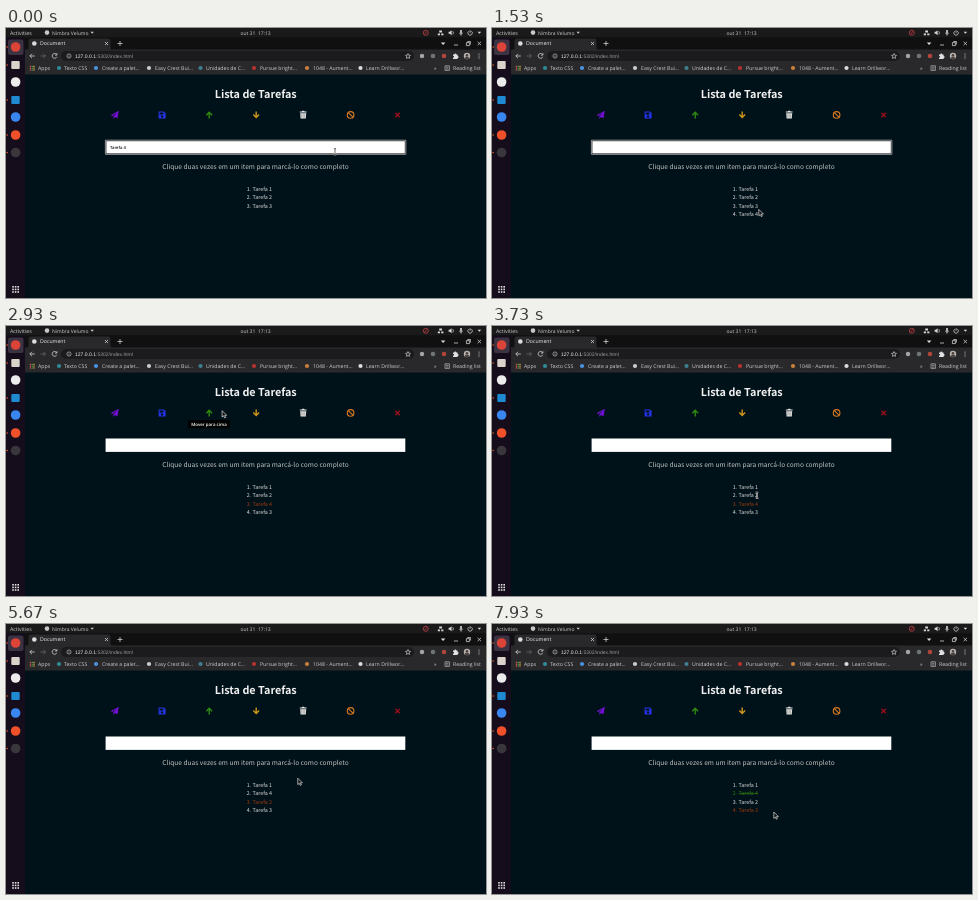
Animation of 480x270 px, one loop 8 s. Source, as an HTML page:

```html
<!DOCTYPE html>
<html lang="pt">
<head>
<meta charset="utf-8">
<title>Lista de Tarefas</title>
<style>
html, body { margin: 0; width: 100%; height: 100%; overflow: hidden; background: #001219; }
svg { display: block; width: 480px; height: 270px; }
text { font-family: "Open Sans", "Noto Sans", sans-serif; font-size: 5.2px; fill: #cecece; white-space: pre; text-rendering: geometricPrecision; }
.page text { font-family: "Noto Sans CJK JP", "Noto Sans CJK", "Noto Sans", sans-serif; fill: #dedede; }
.page .title { font-size: 10.8px; font-weight: 700; fill: #f0f0f0; }
.page .hint { font-size: 6.6px; fill: #c4c4c4; }
.page .row { font-size: 5.35px; }
.page .field { font: 600 4.15px "Open Sans", sans-serif; fill: #111; }
.url { font: 5.04px "Liberation Sans", Arial, sans-serif; fill: #9a9a9c; }
.tip text { font: 600 4.4px "Open Sans", sans-serif; fill: #fff; }
.mid { text-anchor: middle; }
.ln { fill: none; stroke: #cfcfcf; stroke-width: .8; }
</style>
</head>
<body>
<svg viewBox="0 0 480 270" xmlns="http://www.w3.org/2000/svg">
  <rect width="480" height="270" fill="#001219"/>

  <!-- desktop bar -->
  <rect width="480" height="9.5" fill="#1a1a1a"/>
  <text x="4" y="6.6" style="font-size:5.3px">Activities</text>
  <circle cx="41" cy="4.6" r="2.3" fill="#c8c8c8"/>
  <text x="46" y="6.6" style="font-size:5px">Nimbra Velumo</text>
  <path d="M84.5 3.8h3.4l-1.7 2z" fill="#ccc"/>
  <text x="249.6" y="6.6" class="mid" style="font-size:5px">out 31  17:13</text>
  <g class="ln">
    <circle cx="419.8" cy="4.8" r="2.5" stroke="#c8404a"/>
    <path d="M418.6 6.2l2.4-2.8" stroke="#c8404a"/>
    <path d="M446.8 3.2q1.2 1.6 0 3.2M453.2 5q1.8 2.4 3.6 0M455 6v1.6M462.8 3.2a2.2 2.2 0 1 0 2.6 0M464.1 2.2v2.6"/>
  </g>
  <path d="M433.2 2.6h2.8v2h-2.8zM431.8 5.4h2.2v1.8h-2.2zM435.2 5.4h2.2v1.8h-2.2zM442.6 3.8h1.2l1.8-1.5v5l-1.8-1.5h-1.2zM454.2 2h1.6v3.4h-1.6zM471.6 3.8h3.6l-1.8 2z" fill="#d8d8d8"/>

  <!-- browser -->
  <rect x="19" y="9.5" width="461" height="12.5" fill="#101011"/>
  <path d="M21 22q1.5 0 1.5-2v-7q0-2.5 2.5-2.5h77q2.5 0 2.5 2.5v7q0 2 1.5 2z" fill="#29292c"/>
  <rect x="19" y="21.5" width="461" height="25" fill="#29292c"/>
  <rect x="55" y="23" width="353" height="10" rx="5" fill="#1b1b1d"/>
  <circle cx="28.3" cy="15.5" r="2.3" fill="#dcdcdc"/>
  <text x="34" y="17.4" style="fill:#eee">Document</text>
  <path class="ln" d="M99 14l3 3m0-3l-3 3M114 13v5m-2.5-2.5h5M448 17h4M460.4 14.6h3v3h-3zM461.4 13.5h3v3M471.6 13.8l3.4 3.4m0-3.4l-3.4 3.4"/>
  <path d="M434.9 14.6h4.4l-2.2 2.4z" fill="#ddd"/>
  <path class="ln" d="M28.8 28h-5m2.2-2.2L23.8 28l2.2 2.2M50.6 26.6a2.4 2.4 0 1 0 .2 2.2M50.9 25.2v1.9H49"/>
  <path class="ln" d="M34.5 28h5m-2.2-2.2l2.2 2.2-2.2 2.2" style="stroke:#666"/>
  <circle class="ln" cx="63" cy="28" r="2.1" style="stroke-width:.6"/>
  <path class="ln" d="M63 27.7v1.5m0-2.5v.5" style="stroke-width:.6"/>
  <text x="69" y="29.8" class="url"><tspan fill="#f0f0f0">127.0.0.1</tspan>:5302/index.html</text>
  <path d="M402 25.6l.7 1.6 1.8.2-1.3 1.2.3 1.8-1.5-.9-1.5.9.3-1.8-1.3-1.2 1.8-.2z" class="ln" style="stroke-width:.7"/>
  <circle cx="416" cy="28" r="2.2" fill="#a5a5a5"/>
  <circle cx="427" cy="28" r="2.3" fill="#6f7478"/>
  <circle cx="438" cy="28" r="2.3" fill="#b0453c"/>
  <path d="M447 26.5h1.3a1 1 0 0 1 2 0h1.3v1.4a1 1 0 0 1 0 2v1H447v-1.2a1 1 0 0 0 0-2z" fill="#e2e2e2"/>
  <circle cx="461" cy="28" r="3.2" fill="#b9b2ac"/>
  <path d="M458.6 30.2q.4-1.6 2.4-1.6t2.4 1.6q-2.4 2-4.8 0z" fill="#4a4240"/>
  <circle cx="461" cy="27.2" r="1.3" fill="#4a4240"/>
  <g fill="#d0d0d0"><circle cx="473" cy="26" r=".6"/><circle cx="473" cy="28" r=".6"/><circle cx="473" cy="30" r=".6"/></g>
  <g id="marks"></g>
  <text x="428" y="41.8">»</text>
  <path class="ln" d="M439 37.8h4.4v4.6H439zM440 39.3h2.4M440 41h2.4" style="stroke-width:.6"/>
  <text x="447" y="41.8">Reading list</text>

  <!-- dock -->
  <rect y="9.5" width="19" height="260.5" fill="#150d1b"/>
  <rect x="2" y="11.5" width="15.5" height="15.5" rx="2" fill="#3c3342"/>
  <g id="dock"></g>

  <!-- page -->
  <g class="page">
    <text x="249.7" y="69.8" class="title mid">Lista de Tarefas</text>
    <g>
      <path d="M104.6 87.2l8.2-4.4-1.3 7.4-2.7-1.1-1.5 1.8v-2.5l4-4.2-4.9 3.9z" fill="#7410d8"/>
      <path d="M152.6 83.4h5.4l1.6 1.6v5.4h-7zM153.7 84.4v2h3.7v-2zM156 87.3a1.2 1.2 0 1 0 .1 0z" fill="#2433e6" fill-rule="evenodd"/>
      <path d="M203.2 90.4v-6.2m-2.9 3l2.9-3 2.9 3" fill="none" stroke="#2f8a10" stroke-width="1.4"/>
      <path d="M250.2 83.4v6.2m-2.9-3l2.9 3 2.9-3" fill="none" stroke="#cc961c" stroke-width="1.4"/>
      <path d="M293.8 83.6h2l.5-.8h1.8l.5.8h2v1h-6.8zM294.2 85.2h6l-.4 5.4h-5.2z" fill="#e4e4e4"/>
      <path d="M295.7 86.2v3.4m1.5-3.4v3.4m1.5-3.4v3.4" stroke="#777" stroke-width=".5"/>
      <g fill="none" stroke="#d87a22" stroke-width="1.1"><circle cx="344.6" cy="86.9" r="3.3"/><path d="M342.3 84.6l4.6 4.6"/></g>
      <path d="M389.4 84.7l4.4 4.4m0-4.4l-4.4 4.4" stroke="#900f1b" stroke-width="1.5"/>
    </g>
    <g id="ring">
      <rect x="98.9" y="111.8" width="301.4" height="15" rx="1" fill="#b0b0b0"/>
      <rect x="99.7" y="112.5" width="299.8" height="13.6" fill="#222"/>
    </g>
    <rect id="box" fill="#fff"/>
    <text id="field" x="104" y="120.6" class="field">Tarefa 4</text>
    <rect id="caret" x="103.8" y="116.2" width=".5" height="5.6" fill="#111"/>
    <text x="249.5" y="141.4" class="hint mid">Clique duas vezes em um item para marcá-lo como completo</text>
    <g id="rows"></g>
    <g id="mark">
      <rect x="263.7" y="165" width="3.2" height="8.2" fill="#2a66e0"/>
      <text x="263.8" y="171.35" class="row">4</text>
    </g>
  </g>

  <g class="tip" id="tip">
    <rect y="94" width="42" height="8.3" rx="1" fill="#000"/>
    <text x="21" y="99.9" class="mid"></text>
  </g>

  <g id="cursor">
    <path id="arrow" d="M0 0v6.4l1.5-1.3 1 2.1 1.1-.5-1-2.1h2z" fill="#111" stroke="#fff" stroke-width=".6"/>
    <g id="beam" fill="none">
      <path d="M-1.2-2.9h2.4M0-2.9v5.8M-1.2 2.9h2.4" stroke="#fff" stroke-width="1.4"/>
      <path d="M-1.1-2.9h2.2M0-2.9v5.8M-1.1 2.9h2.2" stroke="#111" stroke-width=".6"/>
    </g>
    <path id="hand" d="M-.7 0q.7-.8 1.4 0v2.4l2.6.7q.7.2.6 1l-.6 2.7h-3.6l-2-2.8q0-.9.9-.7l.7.6z" fill="#fff" stroke="#111" stroke-width=".4"/>
  </g>
</svg>
<script>
const LOOP = 8000;
const $ = id => document.getElementById(id);

function add(parent, tag, attrs, text) {
  const el = document.createElementNS("http://www.w3.org/2000/svg", tag);
  for (const k in attrs) el.setAttribute(k, attrs[k]);
  if (text) el.textContent = text;
  parent.append(el);
  return el;
}
const show = (id, on) => { $(id).style.display = on ? "" : "none"; };
const dot = (parent, cx, cy, r, fill) => add(parent, "circle", { cx, cy, r, fill });

// Bookmarks: icon x, label x, colour, label
[
  [53, 58, "#2f8b98", "Texto CSS"],
  [90, 96, "#4b93e0", "Create a palet..."],
  [143, 149, "#c8cdd0", "Easy Crest Bui..."],
  [194.5, 200, "#3f8090", "Unidades de C..."],
  [248, 254, "#b8322e", "Pursue bright..."],
  [301, 307, "#c9803a", "1048 - Aument..."],
  [354.5, 360, "#dcdcdc", "Learn Drillwor..."]
].forEach(([ix, x, fill, label]) => {
  dot($("marks"), ix, 40, 2.1, fill);
  add($("marks"), "text", { x, y: 41.8 }, label);
});
add($("marks"), "text", { x: 32, y: 41.8 }, "Apps");

const grid = (parent, x, y, gap, size, color) => {
  for (let i = 0; i < 9; i++)
    add(parent, "rect", { x: x + i % 3 * gap, y: y + Math.floor(i / 3) * gap, width: size, height: size, fill: color(i) });
};
grid($("marks"), 23.8, 37.8, 1.8, 1.2, i => ["#d9534a", "#4f9d5b", "#d8b23c"][i % 3]);
grid($("dock"), 6.2, 258, 2.6, 1.6, () => "#e0e0e0");

// Dock: y, colour, square?, running?
[
  [19, "#db4437", 0, 1], [37, "#d9d3cb", 1, 1], [54, "#ececec", 0, 0], [72, "#1f8ad2", 1, 1],
  [89, "#3a86f0", 0, 0], [107, "#f0502a", 0, 1], [124.5, "#39363c", 0, 1]
].forEach(([y, fill, square, live]) => {
  if (square) add($("dock"), "rect", { x: 5.3, y: y - 4, width: 8.4, height: 8, rx: 1, fill });
  else dot($("dock"), 9.6, y, 4.8, fill);
  if (live) dot($("dock"), 1.2, y, .8, "#e0562c");
});

const rows = [0, 1, 2, 3].map(i => {
  const y = 162.9 + i * 8.45;
  const g = add($("rows"), "g", {});
  add(g, "text", { x: 240.7, y, class: "row" }, i + 1 + ".");
  return { g, label: add(g, "text", { x: 246.5, y, class: "row" }) };
});

// List: time, order, selected task, completed task
const lists = [
  [0, "123"], [70, "1234"], [1660, "1234", "4"], [2800, "1243", "4"], [4000, "1243", "2"],
  [5040, "1423", "2"], [6200, "1423", "4"], [6330, "1423", "4", "4"], [7130, "1423", "3", "4"]
];

// Pointer: time, x, y, shape from then on
const path = [
  [0, 329, 123.6, "beam"], [590, 329, 123.6, "beam"], [720, 322, 130, "arrow"], [1020, 292, 158, "arrow"],
  [1400, 266.8, 181.4, "arrow"], [1540, 266.8, 181.4, "arrow"], [1620, 263, 185, "beam"],
  [1760, 263, 185, "arrow"], [2250, 206, 86, "hand"], [2330, 206, 86, "hand"], [2560, 204, 85, "hand"],
  [2790, 204, 85, "hand"], [2930, 216, 84.6, "arrow"], [3280, 248, 130, "arrow"], [3540, 262, 167, "beam"],
  [3700, 265, 169.3, "beam"], [4040, 265, 169.3, "arrow"], [4500, 252.6, 86, "hand"], [4640, 252.6, 86, "hand"],
  [4820, 253.2, 85.4, "hand"], [5240, 253.2, 85.4, "arrow"], [5460, 287, 118, "arrow"], [5640, 295, 150, "arrow"],
  [5840, 265, 169, "beam"], [6380, 265, 169, "arrow"], [6600, 279.6, 181, "arrow"], [6720, 278, 186, "arrow"],
  [6850, 264.5, 186, "beam"], [7650, 264.5, 186, "arrow"], [7920, 281.8, 188, "arrow"], [8000, 281.8, 188, "arrow"]
];

const lastAt = (list, t) => list.reduce((n, e, i) => e[0] <= t ? i : n, 0);

// Slope at a key; zero where the pointer rests
function slope(i, c) {
  const a = path[i - 1], b = path[i], d = path[i + 1];
  const rest = (p, q) => p[1] === q[1] && p[2] === q[2];
  if (!a || !d || rest(a, b) || rest(b, d)) return 0;
  return (d[c] - a[c]) / (d[0] - a[0]);
}

function along(i, t, c) {
  const a = path[i], b = path[i + 1];
  const h = b[0] - a[0], u = (t - a[0]) / h, v = 1 - u;
  return a[c] * (1 + 2 * u) * v * v + b[c] * u * u * (3 - 2 * u)
    + h * (slope(i, c) * u * v * v - slope(i + 1, c) * u * u * v);
}

function drawList(t) {
  const [, order, picked, done] = lists[lastAt(lists, t)];
  rows.forEach(({ g, label }, i) => {
    const n = order[i];
    g.style.display = n ? "" : "none";
    if (!n) return;
    const on = n === picked, over = n === done;
    const fill = on ? (over ? "#8a5a14" : "#a03c10") : over ? "#2f7f12" : "#dedede";
    for (const el of g.children) el.style.fill = fill;
    label.textContent = "Tarefa " + n;
    label.style.textDecoration = over ? "line-through" : "none";
  });
  show("mark", t >= 6330 && t < 7130);
}

function drawField(t) {
  const focus = t < 1660;
  show("ring", focus);
  show("field", t < 70);
  const [x, y, w, h] = focus ? [100.4, 113.2, 298.4, 12.2] : [99.6, 112.5, 299.7, 13.4];
  const box = $("box");
  box.setAttribute("x", x);
  box.setAttribute("y", y);
  box.setAttribute("width", w);
  box.setAttribute("height", h);
  show("caret", t >= 70 && t < 330 || t >= 830 && t < 1330);
}

function drawTip(t) {
  const up = t >= 2530 && t < 3000, down = t >= 4670 && t < 5340;
  show("tip", up || down);
  $("tip").setAttribute("transform", `translate(${up ? 182 : 229.2} 0)`);
  $("tip").lastElementChild.textContent = up ? "Mover para cima" : "Mover para baixo";
}

function drawPointer(t) {
  const i = Math.min(lastAt(path, t), path.length - 2);
  $("cursor").setAttribute("transform", `translate(${along(i, t, 1)} ${along(i, t, 2)})`);
  for (const s of ["arrow", "beam", "hand"]) show(s, s === path[i][3]);
}

const start = performance.now();
function frame() {
  const t = (performance.now() - start) % LOOP;
  drawList(t);
  drawField(t);
  drawTip(t);
  drawPointer(t);
  requestAnimationFrame(frame);
}
frame();
</script>
</body>
</html>
```
